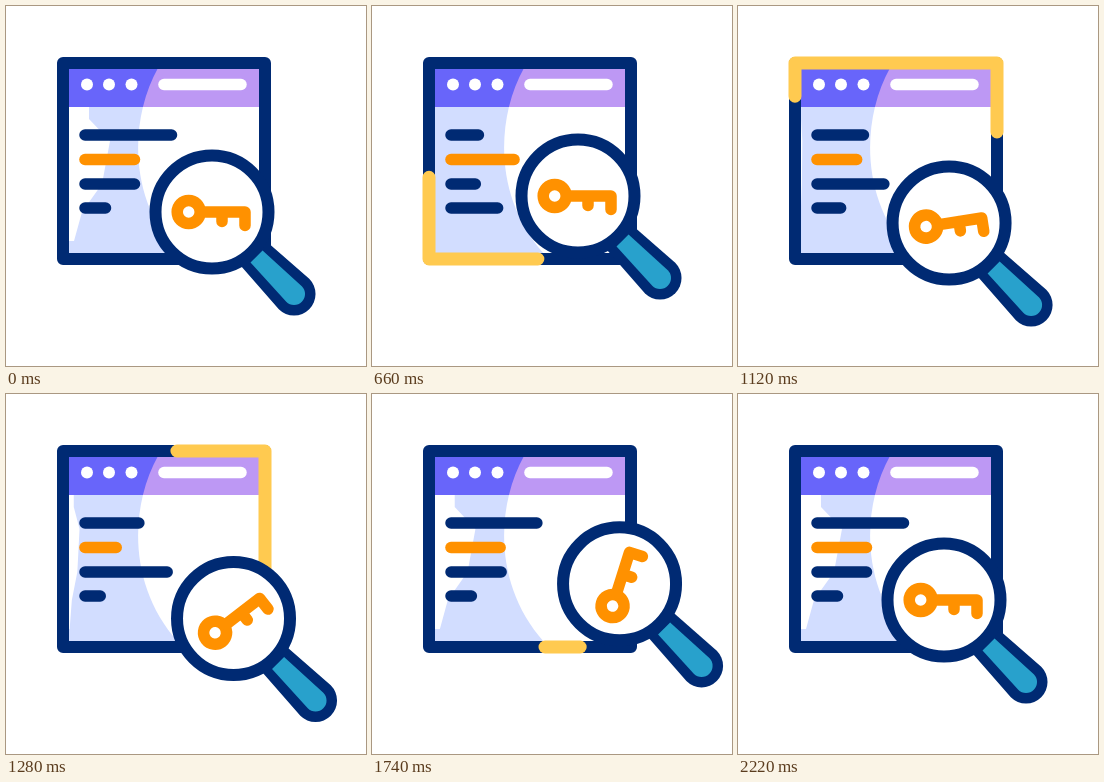
These frames come from a looping animation (360x360 px, 2.4 s). An HTML page:

```html
<!DOCTYPE html>
<html lang="en">
<head>
<meta charset="utf-8">
<title>Keyword search</title>
<style>
  html, body { margin: 0; width: 100%; height: 100%; overflow: hidden; background: #fff; }
  svg { display: block; width: 100vw; height: 100vh; }
  .line { fill: none; stroke-width: 11.5; stroke-linecap: round; stroke-linejoin: round; }
  .thick { stroke-width: 12; }
  .navy { stroke: #002a73; }
  .orange { stroke: #ff9100; }
  #runner { stroke: #ffca50; stroke-width: 13; }
</style>
</head>
<body>
<svg viewBox="0 0 360 360">
  <defs>
    <clipPath id="bar"><path d="M57 57H259V101H57Z"/></clipPath>
    <clipPath id="page"><path d="M57 101H259V253H57Z"/></clipPath>
    <path id="shade" d="M57 62H152C125 110 120 190 172 248V253H57Z"/>
  </defs>

  <g clip-path="url(#bar)">
    <path d="M57 57H259V101H57Z" fill="#bd98f4"/>
    <use href="#shade" fill="#6865fa"/>
  </g>
  <g clip-path="url(#page)">
    <use href="#shade" fill="#d2ddff"/>
    <path id="gap" fill="#fff" d="M0 101H21V113L42 135L34 178L14 206L6 235H0Z"/>
  </g>
  <g fill="#fff">
    <circle cx="81" cy="78.5" r="6"/>
    <circle cx="103" cy="78.5" r="6"/>
    <circle cx="125.5" cy="78.5" r="6"/>
  </g>
  <path class="line" stroke="#fff" d="M158 78.5H235"/>
  <g id="rows"></g>

  <path class="line thick navy" d="M57 57H259V253H57Z"/>
  <path id="runner" class="line" d="M173 253H57V57H259V253H173"/>

  <g id="glass">
    <g transform="rotate(45)">
      <path fill="#002a73" d="M56 -17.5L116 -21.5A21.5 21.5 0 0 1 116 21.5L56 17.5Z"/>
      <path fill="#28a1cc" d="M63 -8.5L116 -11A11 11 0 0 1 116 11L63 8.5Z"/>
    </g>
    <circle class="thick navy" r="56.5" fill="#fff"/>
    <g id="key" class="line orange">
      <circle cx="-23.3" r="11.5"/>
      <path d="M-10 0H33V13.5M10 0V9.5"/>
    </g>
  </g>
</svg>
<script>
const LOOP = 2400, PERIMETER = 796;
const $ = id => document.getElementById(id);

// Sine ease in and out, 0 to 1 between two times
function ease(t, from, to) {
  const u = Math.min(1, Math.max(0, (t - from) / (to - from)));
  return (1 - Math.cos(Math.PI * u)) / 2;
}

// Rises from 0 to 1 at the peak, then falls back to 0
const bump = (t, from, peak, to) => ease(t, from, peak) - ease(t, peak, to);

function addRow(y, tone, end, first, second) {
  const path = document.createElementNS("http://www.w3.org/2000/svg", "path");
  path.setAttribute("class", "line " + tone);
  $("rows").append(path);
  return { y, path, end, first, second };
}

// Each row rests at its end, shifts by first, then by second, then returns
const rows = [
  addRow(129, "navy", 165.5, -61, -32),
  addRow(153.5, "orange", 128.5, 14, -19),
  addRow(178, "navy", 128.5, -26, 34),
  addRow(202, "navy", 99.5, 27, -6)
];

function drawRows(t) {
  const early = bump(t, 200, 720, 1340), late = bump(t, 720, 1340, 1780);
  for (const { y, path, end, first, second } of rows) {
    path.setAttribute("d", `M79 ${y}H${end + first * early + second * late}`);
  }
  const gap = 1 - ease(t, 220, 600) + ease(t, 1000, 1800);
  $("gap").setAttribute("transform", `translate(62 0) scale(${gap} 1)`);
}

function drawRunner(t) {
  const head = PERIMETER * ease(t, 186, 1616);
  const tail = PERIMETER * ease(t, 580, 1922);
  const { style } = $("runner");
  style.visibility = head - tail > 0.5 ? "visible" : "hidden";
  style.strokeDasharray = `${head - tail} 2000`;
  style.strokeDashoffset = -tail;
}

function drawGlass(t) {
  const swing = bump(t, 990, 1605, 2220);
  const x = 206 + 47 * swing;
  const y = 206 - 16 * ease(t, 360, 670) + 35 * ease(t, 670, 1330)
    - 37 * ease(t, 1330, 1810) + 18 * ease(t, 1810, 2220);
  $("glass").setAttribute("transform", `translate(${x} ${y})`);
  $("key").setAttribute("transform", `rotate(${-82 * swing})`);
}

const began = performance.now();
function tick() {
  const t = (performance.now() - began) % LOOP;
  drawRows(t);
  drawRunner(t);
  drawGlass(t);
  requestAnimationFrame(tick);
}
tick();
</script>
</body>
</html>
```
